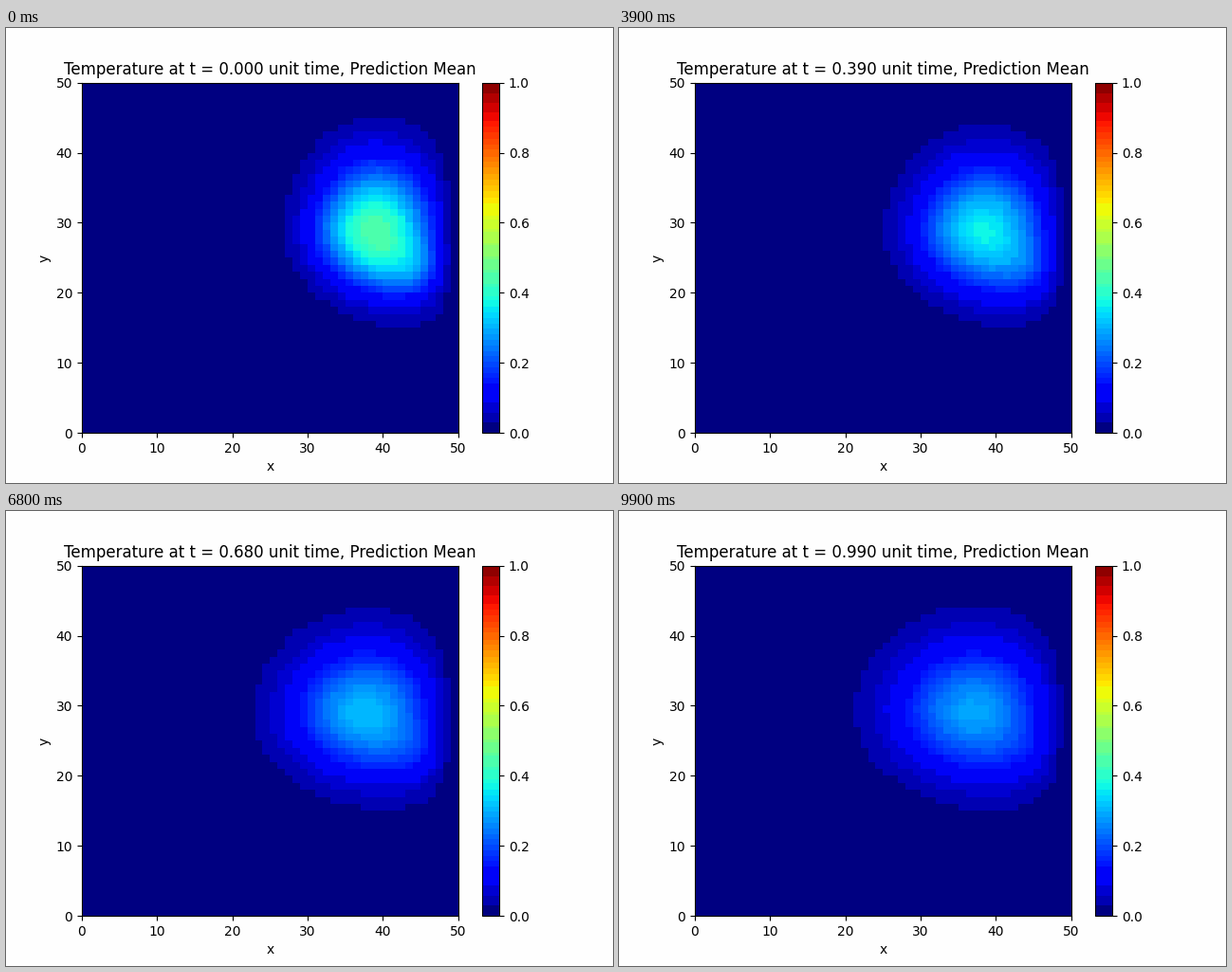
These frames come from a looping animation (640x480 px, 10 s). A matplotlib script:

```python
import numpy as np
import matplotlib.pyplot as plt
from matplotlib.animation import FuncAnimation
from matplotlib.colors import ListedColormap

N = 50
FRAMES = 100

X, Y = np.meshgrid(np.arange(N) + 0.5, np.arange(N) + 0.5)
ROUGH = 1 + 0.01 * np.random.default_rng(4).standard_normal((N, N))
WALL = 1 - np.exp(-np.clip(N - 0.5 - X, 0, None) / 1.5)  # cold right edge


def banded_jet():
    """Jet with nearby colours merged: 8 red, 16 green and 8 blue steps."""
    rgb = plt.get_cmap("jet")(np.arange(256))[:, :3]
    steps = np.round(rgb * 255).astype(int) // [32, 16, 32]
    _, group = np.unique(steps, axis=0, return_inverse=True)
    group = group.ravel()
    weight = np.ones(256)
    weight[0] = 60  # the cold background dominates its band
    out = np.empty_like(rgb)
    for g in range(group.max() + 1):
        same = group == g
        out[same] = np.average(rgb[same], axis=0, weights=weight[same])
    return ListedColormap(out)


def mix(a, b, k):
    return a + (b - a) * k


def smooth(t):
    return t * t * (3 - 2 * t)


def lobe(x, y, size):
    return np.exp(-((X - x) ** 2 + (Y - y) ** 2) / (2 * size**2))


def temperature(t):
    """A lopsided Gaussian that cools and spreads to the left."""
    peak = mix(0.45, 0.286, np.sin(np.pi / 2 * t**1.1))
    cx = mix(39, 37.5, t**1.5)
    cy = mix(28.4, 29, t)
    left = mix(5.2, 7.75, smooth(t))
    right = mix(5.7, 6.65, t)
    bottom = mix(5.75, 6.65, t)
    top = 7.28 - 0.3 * np.sin(np.pi * t)
    bend = mix(0.018, 0.01, t)

    dy = Y - cy
    dx = X - cx - bend * np.minimum(dy, 0) ** 2
    u = dx / np.where(dx < 0, left, right)
    v = dy / np.where(dy < 0, bottom, top)
    spot = peak * np.exp(-(u * u + v * v) / 2)
    shoulders = 0.09 * lobe(44.5, 23.5, 2.6) + 0.03 * lobe(33, 30, 2.5)
    return (spot + mix(1, 0.3, t) * shoulders) * WALL * ROUGH


def label(t):
    return f"Temperature at t = {t:.3f} unit time, Prediction Mean"


plt.rcParams["font.family"] = "DejaVu Sans"
fig = plt.figure(figsize=(6.4, 4.8), dpi=100, facecolor="#fefefe")
ax = fig.add_subplot()
mesh = ax.pcolormesh(temperature(0), cmap=banded_jet(), vmin=0, vmax=1)
fig.colorbar(mesh, ax=ax)
ax.set_xlabel("x")
ax.set_ylabel("y")
title = ax.set_title(label(0))


def update(i):
    t = i / FRAMES
    mesh.set_array(temperature(t))
    title.set_text(label(t))
    return mesh, title


anim = FuncAnimation(fig, update, frames=FRAMES, interval=100, repeat=True)
plt.show()
```
